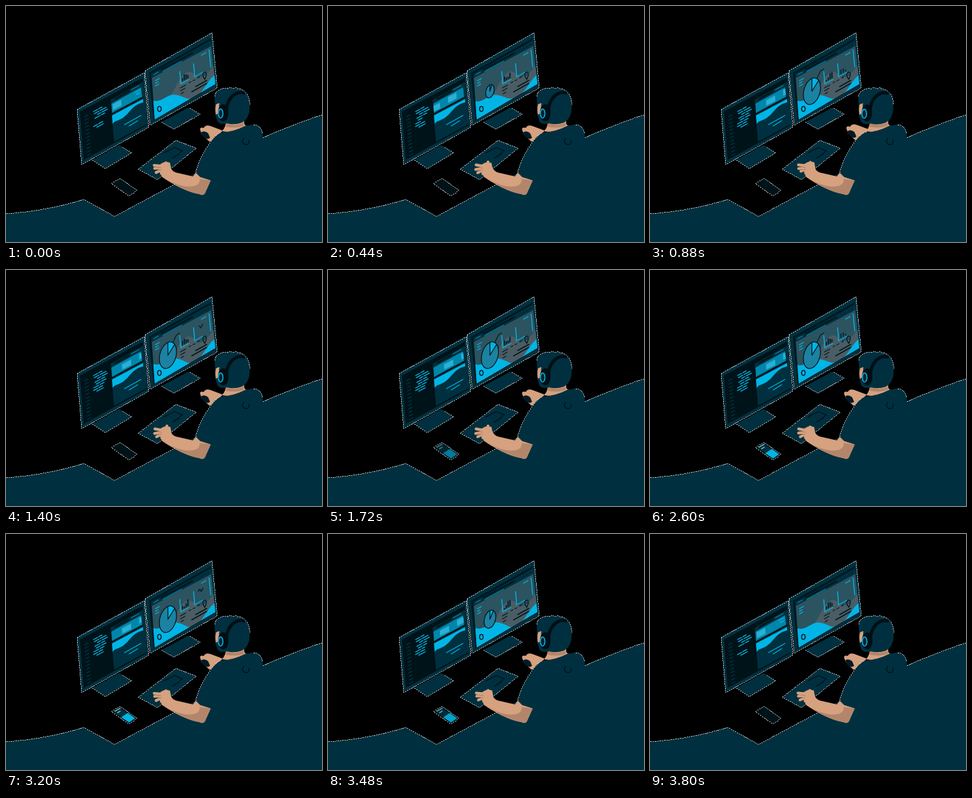
An HTML page for the animation above (3.84 s loop, 480 by 360 pixels).

```html
<!DOCTYPE html>
<html lang="en">
<head>
<meta charset="utf-8">
<title>Developer at a desk</title>
<style>
html, body { margin: 0; width: 100%; height: 100%; overflow: hidden; background: #000; }
svg { display: block; width: 480px; height: 360px; }
.edge { fill: none; stroke: #fff; stroke-width: .9; stroke-dasharray: 2.5 1; opacity: .75; shape-rendering: crispEdges; }
.desk { fill: #00303f; }
.ink { fill: none; stroke: #00161d; stroke-width: 1.5; stroke-linecap: round; stroke-linejoin: round; }
.cy { fill: none; stroke: #00b5e6; stroke-width: 1.4; stroke-linecap: round; stroke-linejoin: round; }
.skin { fill: #d5a17f; }
.shade { fill: #b3866b; }
</style>
</head>
<body>
<svg viewBox="0 0 480 360" aria-label="Person working at two monitors">
  <defs>
    <clipPath id="leftClip"><path d="M112 161L208 109 214 182 118 235Z"/></clipPath>
    <clipPath id="rightClip"><path d="M221 104L311 53 318 119 226 173Z"/></clipPath>
    <clipPath id="heroClip"><path d="M160 149L205 124 207 139 161 164Z"/></clipPath>
  </defs>
  <rect width="480" height="360"/>

  <!-- desk -->
  <path class="desk" d="M0 317Q65 312 118 295L165 321 390 200Q435 181 480 166V360H0Z"/>
  <path class="edge" d="M0 317Q65 312 118 295L165 321 258 271M390 201Q435 181 480 166"/>

  <!-- left monitor -->
  <path class="desk" d="M131 235L172 212 191 224 151 248Z"/>
  <path class="edge" d="M131 235L151 248 191 224 176 215"/>
  <path class="desk" d="M110 156L208 102Q211 100 211 104L217 185 117 241Q115 242 114.500 239L108 160Q108 157 110 156Z"/>
  <path class="edge" d="M108 158L210 102 217 185 115 242Z"/>
  <g clip-path="url(#leftClip)">
    <path fill="#001318" d="M112 161L208 109 214 182 118 235Z"/>
    <g id="ticks" stroke="#00303f" stroke-width="1.500"></g>
    <g id="code" class="cy" stroke-linecap="butt"></g>
    <path class="desk" d="M159 143L209 115 214 180 164 207Z"/>
    <path class="ink" style="stroke-width:2.400" d="M166 142L187 130"/>
    <path stroke="#0088ac" stroke-width="1.200" d="M190 128L203 121"/>
    <g clip-path="url(#heroClip)">
      <path fill="#0086ab" d="M160 148L206 123 207 139 161 164Z"/>
      <g id="slides">
        <path fill="#2aafd5" d="M176 144L190 136.500 190.500 145 176.500 152Z"/>
        <g transform="translate(40 -22)">
          <path fill="#2aafd5" d="M162 150L175 143 175.500 152 162.500 159Z"/>
          <path class="cy" d="M196 132L204 127.500M198 135L203 132.500"/>
        </g>
      </g>
    </g>
    <path class="ink" style="stroke-width:2" d="M160 165L208 139"/>
    <path fill="#00b5e6" d="M161 167L208 142 208.500 147C192 150 187 165 177 171S166 174 162 180Z"/>
    <path class="cy" style="stroke-width:1.200" d="M180 181L205 167M187 183L200 175"/>
  </g>

  <!-- right monitor -->
  <path class="desk" d="M236 177L277 155 295 165 255 188Z"/>
  <path class="edge" d="M236 177L255 188 295 165 279 156"/>
  <path class="desk" d="M213 97L310 42Q313 40 313.500 44L321 123Q321 125 319 126L221 181Q219 182 218.500 179L211 101Q211 98 213 97Z"/>
  <path class="edge" d="M211 99L313 41 321 125 219 182Z"/>
  <path fill="#001a22" d="M217 102L311 49 318 120 224 175Z"/>
  <g clip-path="url(#rightClip)">
    <path fill="#2c5360" d="M220 104L312 52 319 120 225 174Z"/>
    <path id="hill" fill="#4a5d64"/>
    <path id="wave" fill="#00b5e6"/>
    <path class="desk" d="M218 101L311 50 312 61 219 111Z"/>
    <path class="ink" style="stroke-width:2.200" d="M236 97L283 72"/>
    <path stroke="#0088ac" stroke-width="1.200" d="M224 105L232 100.500M238 100L267 84"/>
    <path class="ink" d="M297 64.500v.1M302 62v.1M307 59.300v.1"/>
    <path class="cy" d="M227 114L233 110.500M227 118L231 115.500M227 122L232 119M297 75L304 71"/>
    <path class="cy" d="M308.500 67L311 93"/>
    <path class="cy" d="M264 100L265.500 119 278 112M285 88L286.500 108 299 101"/>
    <g id="bars" stroke="#00222e" stroke-width="2"></g>
    <g id="mini" stroke="#00222e" stroke-width="1.600">
      <path d="M290 104V97M293.500 102V95M297 100V97"/>
      <path fill="none" d="M293 85L296 88 299 82"/>
      <path fill="none" d="M292 88Q294 82 295.500 86T299 82"/>
    </g>
    <path class="ink" style="stroke-width:1.200" d="M265 125L273 120.500M265 129.500L272 125.500M266 134L270 131.500M278 117L281 115.500M284 114L287 112.500M291 110L294 108"/>
    <path class="ink" d="M288 123L305 113.500M282 131L305 118"/>
    <path class="ink" style="stroke-width:1.300" d="M302 112Q298.500 107 299 104Q300 100 303 101Q306 103 302 112M302 105v.1"/>
    <ellipse class="ink" cx="233" cy="157" rx="2.700" ry="3.700"/>
    <g id="pie">
      <path id="pointer" class="ink" style="stroke-width:1.100" d="M247 124L259 99 264 96"/>
      <g id="disc">
        <circle r="1" fill="#1c82a2"/>
        <path id="sector" fill="#00b5e6"/>
        <g class="ink" style="stroke-width:1.300">
          <circle r="1" vector-effect="non-scaling-stroke"/>
          <path id="spokes" vector-effect="non-scaling-stroke"/>
        </g>
      </g>
    </g>
  </g>

  <!-- keyboard, phone -->
  <path class="desk" d="M201 249L258 205 289 217 230 265Z"/>
  <path class="edge" d="M201 249L258 205 289 217 230 265Z"/>
  <path class="ink" d="M240 224L256 216 268 221 260 227M253 232L263 226"/>
  <path fill="#001318" d="M160 271L172 263.500Q174 262.500 176 264L199 280.500 187 290Z"/>
  <path class="edge" d="M160 271L173 263 199 281 187 290Z"/>
  <g id="phone">
    <path class="desk" d="M163 271L173 265 196 281 187 287.500Z"/>
    <path fill="#00b5e6" d="M175 279.500L185 273 196 281 187 287.500Z"/>
    <path stroke="#8fd9ec" stroke-width="1.200" d="M165 270.500L174 265.500M169 273L174 270"/>
  </g>

  <!-- mouse and right hand -->
  <g id="mouseHand">
    <path class="skin" d="M295 189C294 186 297 184.500 300 186L303 183Q307 181 313 184L329 190 318 204 309 207C305 203 300 199 297 195Z"/>
    <path fill="#001b25" d="M296 193Q301 189 307 194L310 201Q306 205 300 200Z"/>
  </g>

  <!-- left arm -->
  <path class="skin" d="M236 252L250 246Q252 252 258 254L284 260 289 253 311 266 302 286Q299 290 294 287C276 284 254 273 236 260Z"/>
  <path class="shade" d="M311 266L302 286Q299 290 294 287C280 285 262 277 248 267Q272 279 288 274Q295 271 294 264Z"/>
  <g id="typing">
    <path class="skin" d="M233 243Q239 236 249 239L251 249 247 260 234 257Z"/>
    <g id="fingers" stroke="#d5a17f" stroke-width="4.200" stroke-linecap="round"></g>
    <path stroke="#a87458" stroke-width=".8" fill="none" d="M229 246L236 247M230 251L236 250"/>
  </g>

  <!-- body -->
  <path class="skin" d="M334 172H363Q359 181 366 183Q350 195 328 191Q335 184 334 172Z"/>
  <path class="shade" d="M335 177Q347 185 360 178L362 182Q350 188 334 184Z"/>
  <path class="desk" d="M326 193Q346 192 363 183L374 181Q387 181 390 194Q391 201 386 205L388 280 340 300 311 266 295 261 288 254Q294 231 309 210Q316 198 326 193Z"/>
  <path class="edge" d="M288 254Q294 231 309 210Q316 198 326 193M376 181Q387 182 390 195"/>
  <path class="ink" d="M361 202C357 207 361 213 367 211Q370 209 369 205"/>
  <g id="head">
    <path fill="#003040" d="M317 138C318 129 328 124 337 126L340 124 346 126 350 124 352 126C364 127 371 138 370 151C371 165 366 174 358 178Q347 182 336 179Q326 182 321 176L318 166Z"/>
    <path class="skin" d="M319 150L324 148 323 163 319 166Q317 158 319 150Z"/>
    <path class="edge" d="M317 138C318 129 328 124 337 126L340 124 346 126 350 124 352 126C364 127 371 138 370 151"/>
    <path fill="none" stroke="#000f14" stroke-width="5" d="M363 133C348 128 336 142 335 158"/>
    <ellipse cx="330" cy="163" rx="8" ry="13" fill="#000f14"/>
    <ellipse cx="326" cy="164" rx="3.500" ry="6.800" fill="#00202b" stroke="#00a9d8" stroke-width="1.800"/>
  </g>
</svg>
<script>
const LOOP = 3840, STEP = 40, TAU = Math.PI * 2, SLOPE = -.54;
const $ = id => document.getElementById(id);
const clamp = x => Math.max(0, Math.min(1, x));
const ease = x => x * x * (3 - 2 * x);
const ramp = (t, a, b) => ease(clamp((t - a) / (b - a)));
const span = (t, a, b, c, d) => ramp(t, a, b) * (1 - ramp(t, c, d));
const inside = (t, a, b) => t >= a && t < b;
const swing = (t, turns, phase = 0) => Math.sin(TAU * (t / LOOP * turns + phase));
const set = (el, name, value) => el.setAttribute(name, value);

function add(parent, tag) {
  const el = document.createElementNS("http://www.w3.org/2000/svg", tag);
  return $(parent).appendChild(el);
}

for (let i = 0; i < 12; i++) {
  const x = 119 + i * .4, y = 169 + i * 5.4;
  set(add("ticks", "path"), "d", `M${x} ${y}l6 -3.2`);
}

// indent, first word, second word, typed during the loop
const rows = [
  [0, 6, 5, 0], [1, 7, 9, 0], [6, 5, 8, 0], [2, 8, 5, 0],
  [4, 6, 7, 1], [0, 8, 6, 1], [0, 6, 6, 0], [5, 10, 0, 0]
];
const lines = rows.map(() => add("code", "path"));
const bars = [0, 1, 2, 3].map(() => add("bars", "path"));
const fingers = [[225, 243], [225, 249], [228, 254], [243, 239]].map(p => ({ p, el: add("fingers", "path") }));
const minis = [...$("mini").children];

function drawCode(t) {
  const grown = ramp(t, 120, 800) * (1 - ramp(t, 3400, 3760));
  rows.forEach(([indent, a, b, typed], i) => {
    const x = 133 + indent, y = 161 + i * 3.8 + indent * SLOPE;
    const len = (a + b + 2) * (typed ? grown : 1);
    const first = Math.min(a, len), second = Math.max(0, Math.min(b, len - a - 2));
    let d = first > .1 ? `M${x} ${y}l${first} ${first * SLOPE}` : "";
    if (second) d += `M${x + a + 2} ${y + (a + 2) * SLOPE}l${second} ${second * SLOPE}`;
    set(lines[i], "d", d);
  });
}

function drawChart(t) {
  const w = swing(t, 2);
  set($("hill"), "d", `M222 156Q244 ${151 + w} 259 121T286 ${105 - w}T319 85V120L225 174Z`);
  set($("wave"), "d", `M221 ${143 + w}C232 ${149 + w} 241 ${139 - w} 250 136S268 ${139 + w} 275 141S291 ${139 - w} 299 128S311 109 319 104V121L225 175Z`);
  bars.forEach((bar, i) => {
    const h = 5 + i + 3 * swing(t, 3, i * .23);
    set(bar, "d", `M${268 + i * 2.8} ${115 - i * 1.5}v${-h}`);
  });
  minis[0].style.display = inside(t, 680, 1120) || inside(t, 2360, 2840) ? "" : "none";
  minis[1].style.display = inside(t, 1160, 1680) ? "" : "none";
  minis[2].style.display = inside(t, 2960, 3400) ? "" : "none";
}

function drawPie(t) {
  const s = span(t, 240, 640, 3360, 3680);
  $("pie").style.display = s > .001 ? "" : "none";
  set($("disc"), "transform", `matrix(${13 * s} ${-7 * s} ${s} ${19 * s} 246 130)`);
  $("pointer").style.opacity = span(t, 620, 760, 2920, 3080);
  const end = -1.5 + .9 * s, x = Math.cos(end), y = Math.sin(end);
  set($("sector"), "d", `M0 0L.07 -1A1 1 0 0 1 ${x} ${y}Z`);
  set($("spokes"), "d", `M.07 -1L0 0 ${x} ${y}`);
}

function drawHands(t) {
  fingers.forEach(({ p: [x, y], el }, i) => {
    const lift = 1.5 * Math.max(0, swing(t, 12, i * .29));
    set(el, "d", `M${x + lift * .5} ${y - lift}L${i === 3 ? 243 : 236} ${i === 3 ? 246 : 244 + i * 3}`);
  });
  set($("typing"), "transform", `translate(${.7 * swing(t, 6)} ${.6 * swing(t, 12)})`);
  const m = span(t, 500, 850, 950, 1300);
  set($("mouseHand"), "transform", `translate(${3.5 * m} ${-1.8 * m})`);
  set($("head"), "transform", `translate(${-.6 * m} ${.3 * m})`);
}

function render(now) {
  const t = Math.floor((now % LOOP) / STEP) * STEP;
  const slide = 1 - ramp(t, 240, 640) + span(t, 1720, 1920, 2160, 2440) + ramp(t, 3400, 3720);
  set($("slides"), "transform", `translate(${-40 * slide} ${22 * slide})`);
  $("phone").style.opacity = span(t, 1600, 1800, 3440, 3640);
  drawCode(t);
  drawChart(t);
  drawPie(t);
  drawHands(t);
}

const start = performance.now();
function loop(now) {
  render(Math.max(0, now - start));
  requestAnimationFrame(loop);
}
render(0);
requestAnimationFrame(loop);
</script>
</body>
</html>
```
